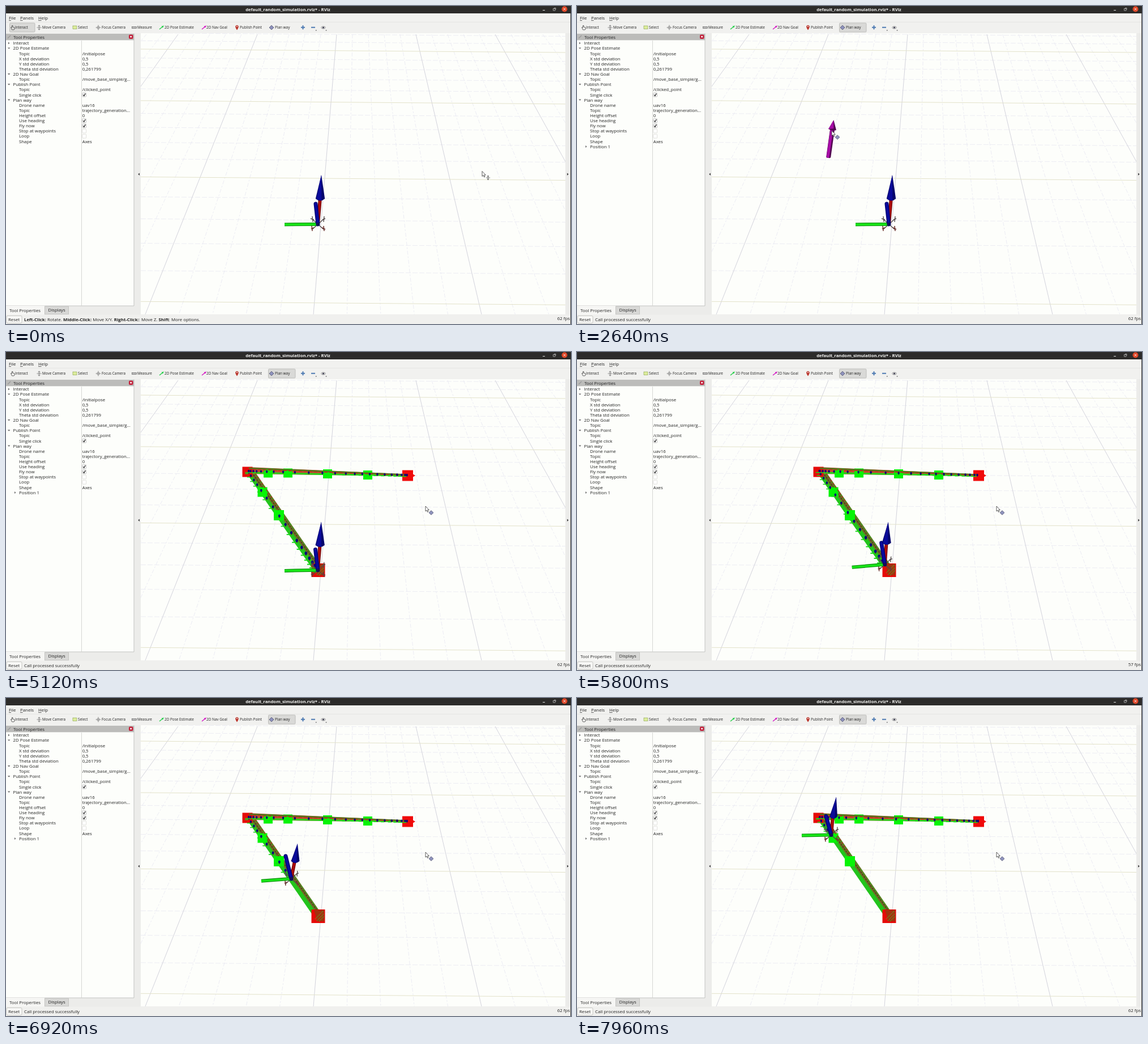
An HTML page that plays this animation: 998x561 px, repeating every 8 s.

```html
<!DOCTYPE html>
<html lang="en">
<head>
<meta charset="utf-8">
<title>Waypoint planning</title>
<style>
html, body { margin: 0; width: 100%; height: 100%; overflow: hidden; background: #efefee; }
svg { display: block; width: 100vw; height: 100vh; }
text { font-family: "Open Sans", "Noto Sans", sans-serif; font-size: 7.85px; fill: #222; white-space: pre; }
.tool { font-size: 6.4px; }
.title { font-size: 7.76px; font-weight: 700; fill: #f4f4f2; }
.b { font-weight: 700; }
</style>
</head>
<body>
<svg id="stage" viewBox="0 0 998 561"></svg>
<script>
const LOOP = 8000, STEP = 200;
const PICK = 840, DOWN1 = 2280, UP1 = 2880, DOWN2 = 3720, UP2 = 4200, SENT = 4920, START = 5000;
const stage = document.getElementById('stage');

function el(tag, attrs, parent = stage, content) {
  const node = document.createElementNS('http://www.w3.org/2000/svg', tag);
  for (const key in attrs) node.setAttribute(key, attrs[key]);
  if (content !== undefined) node.textContent = content;
  parent.appendChild(node);
  return node;
}
const group = (parent = stage) => el('g', {}, parent);
const rect = (x, y, width, height, fill, parent, more) => el('rect', { x, y, width, height, fill, ...more }, parent);
const path = (d, stroke, width = 1, parent = stage, more) =>
  el('path', { d, stroke, 'stroke-width': width, fill: 'none', ...more }, parent);
const fill = (d, color, parent) => el('path', { d, fill: color }, parent);
const text = (x, y, str, cls = '', parent = stage) => el('text', { x, y, class: cls }, parent, str);
const show = (node, on) => node.setAttribute('display', on ? 'inline' : 'none');
const move = (node, x, y) => node.setAttribute('transform', `translate(${x.toFixed(2)} ${y.toFixed(2)})`);
const mix = (a, b, u) => a + (b - a) * u;

// Value of rows [time, ...numbers] at time t
function track(rows, t, ease = u => u) {
  let i = 0;
  while (i < rows.length - 2 && t >= rows[i + 1][0]) i++;
  const a = rows[i], b = rows[i + 1];
  const u = ease(Math.min(1, Math.max(0, (t - a[0]) / (b[0] - a[0]))));
  return a.slice(1).map((v, k) => mix(v, b[k + 1], u));
}

// ---- 3D view ----
const clip = el('clipPath', { id: 'view' }, el('defs', {}));
rect(238, 48, 750, 496, '#000', clip);
const view = el('g', { 'clip-path': 'url(#view)' });
rect(238, 48, 750, 496, '#fdfefb', view);

function drawGrid() {
  for (const main of [false, true]) {
    for (let i = -20; i <= 20; i++) {
      if ((i % 5 === 0) !== main) continue;
      const top = 584 + 28 * i, bottom = 543 + 59.4 * i;
      path(`M${top} 50L${bottom} 544`, main ? '#d3d3dc' : '#e8e8f2', main ? 1 : .8, view,
        main ? {} : { 'stroke-dasharray': '7 3 3 3' });
    }
    for (let j = -1; j <= 18; j++) {
      if ((j % 5 === 0) !== main) continue;
      const y = 1000 / (1.094 + .06926 * j) - 390;
      path(`M238 ${y - 2.8}L988 ${y + 3.2}`, main ? '#e3e2ca' : '#e9e9f1', main ? 1 : .8, view,
        main ? {} : { 'stroke-dasharray': '9 3' });
    }
  }
}
drawGrid();

function bar(x1, y1, x2, y2, color, dark, w, parent) {
  const d = `M${x1} ${y1}L${x2} ${y2}`;
  path(d, dark, w, parent);
  path(d, color, w * .6, parent);
}
function axes(x, y, green, blue, red) {
  const g = group(view);
  bar(x, y, x + green[0], y + green[1], '#1cec1c', '#15a815', 5, g);
  bar(x, y, x + red[0], y + red[1], '#a01010', '#780c0c', 4.5, g);
  bar(x, y, x + blue[0], y + blue[1], '#0a0aa0', '#06066c', 4.5, g);
  return g;
}
const goal1 = axes(444, 267, [-42, 1], [-9, -31], [5, -29]);
const goal2 = axes(700, 272, [6, -29], [-5, -32], [38, -1]);

function pointer(x, y, length, head, angle, light, dark) {
  const g = el('g', { transform: `translate(${x} ${y}) rotate(${angle})` }, view);
  const neck = length - head;
  rect(0, -4, neck + 1, 8, dark, g, { rx: 2 });
  rect(0, -3.6, neck, 5, light, g, { rx: 2 });
  fill(`M${neck - 2} -7Q${neck - 5} 0 ${neck - 2} 7L${length} 0Z`, dark, g);
  fill(`M${neck - 2} -7L${neck} 2L${length} 0Z`, light, g);
  return g;
}
const arrow1 = pointer(444, 268, 67.5, 15, -82, '#a60ca6', '#520652');
const arrow2 = pointer(700, 272, 105, 20, -.5, '#dc10d8', '#780876');

// ---- Planned path ----
const from = [551, 385], corner = [428, 212];
const along = [0, .5, 2, 6, 12.5, 20, 30, 41, 55, 70.5, 88, 106, 125, 145, 163, 179, 189, 199, 208];
const across = [428, 429, 434, 439, 445, 454, 465, 478, 497, 519, 545, 568, 590, 607, 622, 634, 648, 661, 674, 686, 694, 702, 707, 709];
const flight = [
  ...along.map(s => from.map((v, k) => mix(v, corner[k], s / 212))),
  ...across.map(x => [x, 210 + (x - 428) * .025])
].map((p, i) => [START + i * STEP, ...p]);
const flightEnd = flight[flight.length - 1][0];

const plan = group(view);
function square(x, y, size, color) {
  rect(x - size / 2, y - size / 2, size, size, color, plan);
}
fill('M543 385L553 376L434 209L425 214Z', '#22c41c', plan);
fill('M547 377L554 376L436 206L430 211Z', '#6f6a24', plan);
path('M549 374L433 211', '#43431a', 1.6, plan, { 'stroke-dasharray': '3 2' });
path('M552 375L435 207', '#39a51e', 1.4, plan, { 'stroke-dasharray': '5 2' });
fill('M428 203L709 215.5V219L428 215Z', '#be4a30', plan);
path('M430 213L706 218', '#28d41c', 3, plan);
square(551.5, 385, 24, '#e60a08');
fill('M544 374H562V394H550Z', 'rgba(110,80,20,.55)', plan);
path('M549 393L561 381M553 394L562 385M546 390L560 376', '#55a023', 1.3, plan, { 'stroke-dasharray': '2 1' });
square(426.5, 211.5, 18, '#e60a08');
square(709.5, 218, 19, '#f00a0a');
fill('M718 215L723 218L718 221Z', '#f00a0a', plan);
[[463, 213.5, 16], [498, 213.5, 16], [568, 215, 16], [639, 217, 16], [453, 247, 17], [482, 288, 18]]
  .forEach(([x, y, size]) => square(x, y, size, '#06f406'));
path('M429 205L706 216.5', '#4d7a1c', 2.6, plan);
path('M436 207L706 217.5', '#c32a1c', 1.5, plan, { 'stroke-dasharray': '6 3' });
path('M436 208L482 275', '#a03a20', 1.5, plan, { 'stroke-dasharray': '4 3' });

const dots = flight.map(() => {
  const g = group(plan);
  path('M-9 3.5H-1', '#18d818', 2, g);
  path('M0 4L1 0', '#8a1414', 2, g);
  el('ellipse', { cx: 0, cy: 0, rx: 2.3, ry: 3, fill: '#06067c' }, g);
  return g;
});

// ---- Drone with its pose axes ----
const drone = group(view);
const frame = group(drone);
path('M-10 9L10 -9M-10 -9L10 9', '#504848', 1.3, frame);
path('M-10 -14L-9 -4M11 -14L10 -4M-13 -10L-7 -8M8 -8L13 -10', '#554d4d', 1.4, frame);
path('M-11 3L-10 12M10 3L11 12M-12 8L-7 6M7 6L13 9', '#713a36', 1.6, frame);
const limbs = [['#18e818', '#129c12', 6], ['#b00c0c', '#790808', 6], ['#0808a0', '#050574', 7]].map(([light, dark, w]) =>
  [path('', dark, w, drone), path('', light, w * .55, drone)]);
limbs[2].forEach(p => p.setAttribute('stroke-linecap', 'round'));
const coneDark = fill('', '#05056c', drone), coneLight = fill('', '#0a0a9a', drone);
el('circle', { cx: 0, cy: 0, r: 3, fill: '#141452' }, drone);

// time, green xy, red xy, blue xy, tip xy, cone base xy, half width
const poses = [
  [START, -59, .5, 4, -47, -4, -36, 6, -87, 4, -45, 8.2],
  [5800, -58, 5, 3, -40, -6, -38, 6, -75, 3, -38, 8],
  [6920, -53, 4, 6, -31, -10, -40, 11, -62, 7, -31, 7.5],
  [7960, -52, 1, 3, -33, -9, -33, 9, -67, 4, -32, 7]
];
function poseDrone(t) {
  const [gx, gy, rx, ry, bx, by, tx, ty, cx, cy, w] = track(poses, t);
  [[gx, gy], [rx, ry], [bx, by]].forEach(([x, y], i) =>
    limbs[i].forEach(p => p.setAttribute('d', `M0 0L${x} ${y}`)));
  coneDark.setAttribute('d', `M${tx} ${ty}L${cx + w} ${cy}Q${cx} ${cy + 7} ${cx - w} ${cy}Z`);
  coneLight.setAttribute('d', `M${tx} ${ty}L${cx + w * .3} ${cy + 3}Q${cx - w * .5} ${cy + 3} ${cx - w * .8} ${cy}Z`);
  const [x, y] = track(flight, t);
  move(drone, x, y);
}

// ---- Window frame, menu and toolbar ----
rect(0, 0, 998, 13, '#2c2b2a');
el('text', { x: 498, y: 8.5, 'text-anchor': 'middle', class: 'title' }, stage, 'default_random_simulation.rviz* - RViz');
path('M948 7.5H952', '#ddd');
path('M966.5 4.5H970V8H966.5ZM968 3.5H971V6.5', '#bbb', .8);
el('circle', { cx: 986.5, cy: 5.5, r: 5, fill: '#df4526' });
path('M984.7 3.7L988.3 7.3M988.3 3.7L984.7 7.3', '#fff', 1);
rect(0, 13, 998, 35, '#f1f1ef');
path('M0 28.5H998', '#e2e2e0', .8);
[[5, 'File', 4], [25, 'Panels', 4.6], [57, 'Help', 5.6]].forEach(([x, name, w]) => {
  text(x, 24.3, name);
  path(`M${x} 25.6h${w}`, '#222', .7);
});

function pressed(x, w) {
  return rect(x, 30, w, 16, '#d9d9d7', stage, { rx: 1.5, stroke: '#b4b4b2', 'stroke-width': .8 });
}
const interactOn = pressed(6.5, 44.5), planOn = pressed(463.5, 47.5);
[[16, 'Interact'], [64, 'Move Camera'], [127, 'Select'], [169, 'Focus Camera'], [232, 'Measure'], [280, '2D Pose Estimate'],
  [354, '2D Nav Goal'], [413, 'Publish Point'], [475, 'Plan way']].forEach(([x, name]) => text(x, 40.2, name, 'tool'));
path('M10 41L8.5 37.5L10.5 38V34.5H12V37L15 38V41L14 42H10.5Z', '#555', .9);
const cross = (r, d = r - 2) => `M${-r} 0H${r}M0 ${-r}V${r}M${-d} ${-r + 1.5}L0 ${-r}L${d} ${-r + 1.5}M${-d} ${r - 1.5}L0 ${r}L${d} ${r - 1.5}`;
path(cross(4), '#777', .9, stage, { transform: 'translate(58.5 38)' });
rect(118, 35, 7, 5.5, '#dcec9c', stage, { stroke: '#7b9a3c', 'stroke-width': .8, 'stroke-dasharray': '1.5 .7' });
path('M163 33.5V42.5M158.5 38H167.5', '#888', .9);
el('circle', { cx: 163, cy: 38, r: 2.3, fill: 'none', stroke: '#888', 'stroke-width': .8 });
rect(222.5, 36.5, 8, 3, '#bbb', stage, { stroke: '#555', 'stroke-width': .6 });
for (const [x, color] of [[271, '#24d048'], [346, '#d414c4']]) {
  path(`M${x} 41L${x + 5} 37`, color, 1.5);
  fill(`M${x + 3.5} 35.8L${x + 8} 34.5L${x + 6} 38.6Z`, color);
}
fill('M408 42.5Q404.5 37.5 405.4 35.5A2.8 2.8 0 0 1 410.6 35.5Q411.5 37.5 408 42.5Z', '#bb342b');
el('circle', { cx: 408, cy: 36, r: 1, fill: '#f1f1ef' });
const diamond = 'M0 -3.8L4 0L0 3.8L-4 0Z';
const gem = (parent, more) => el('path', { d: diamond, fill: '#8f93bd', stroke: '#4e506e', 'stroke-width': .8, ...more }, parent);
gem(stage, { transform: 'translate(469 38)' });
path('M521 37.8H528M524.5 34.3V41.3M539 37.8H546', '#4f7bb3', 2.1);
fill('M546.5 42.5h2.6l-1.3 1.4ZM564.3 42.5h2.6l-1.3 1.4Z', '#444');
el('ellipse', { cx: 560.5, cy: 38, rx: 3.8, ry: 2.2, fill: '#ddd', stroke: '#888', 'stroke-width': .7 });
el('circle', { cx: 560.5, cy: 38, r: 1.6, fill: '#445' });

// ---- Property panel ----
rect(0, 48, 238, 497, '#ececea');
rect(0, 49, 226, 11.5, '#bcbcba');
path('M3 57L8 52', '#999', 1.4);
text(13, 57.6, 'Tool Properties');
rect(217, 50.5, 7.5, 7.5, '#c3213b', stage, { rx: 2 });
el('circle', { cx: 220.7, cy: 54.2, r: 1.4, fill: '#fff' });
rect(0, 60.5, 226, 468.5, '#fdfefb');
path('M226 48.5V529H0', '#bdbdbb', .9);
path('M133.5 61V529', '#d2d2cf', .9);

const rowY = i => 65.5 + i * 9.12;
const rows = [
  [0, 'Interact'], [0, '2D Pose Estimate'], [1, 'Topic', '/initialpose'], [1, 'X std deviation', '0,5'],
  [1, 'Y std deviation', '0,5'], [1, 'Theta std deviation', '0,261799'], [0, '2D Nav Goal'],
  [1, 'Topic', '/move_base_simple/g...'], [0, 'Publish Point'], [1, 'Topic', '/clicked_point'],
  [1, 'Single click', true], [0, 'Plan way'], [1, 'Drone name', 'uav16'], [1, 'Topic', 'trajectory_generation...'],
  [1, 'Height offset', '0'], [1, 'Use heading', true], [1, 'Fly now', true], [1, 'Stop at waypoints', false],
  [1, 'Loop', false], [1, 'Shape', 'Axes']
];
const closedMark = (x, y, parent) => fill(`M${x} ${y - 2}l2.4 2l-2.4 2Z`, '#666', parent);
rows.forEach(([level, name, value], i) => {
  const y = rowY(i);
  text(level ? 23 : 12.5, y + 2.8, name);
  if (!level) {
    if (i) fill(`M3 ${y - 1.2}h4.4l-2.2 2.4Z`, '#666');
    else closedMark(4, y);
  }
  if (typeof value === 'string') text(134.7, y + 2.8, value);
  if (typeof value === 'boolean') {
    rect(134.8, y - 3.4, 6.8, 6.8, '#fff', stage, { stroke: value ? '#aaa' : '#d4d4d0', 'stroke-width': .7, rx: 1 });
    if (value) path(`M136.3 ${y}l1.5 1.9l2.5 -4.2`, '#222', 1.2);
  }
});
const positions = [1, 2, 3].map(n => {
  const g = group(), y = rowY(19 + n);
  closedMark(15, y, g);
  text(23, y + 2.8, 'Position ' + n, '', g);
  return g;
});

// ---- Tabs, status bar and edges ----
rect(0, 529, 68.5, 16, '#f6f6f4');
rect(68.5, 530, 42, 14, '#d8d8d6', stage, { stroke: '#bcbcba', 'stroke-width': .8 });
text(6, 539.7, 'Tool Properties');
text(74.5, 539.3, 'Displays');
rect(988, 48, 10, 497, '#ececea');
fill('M236 294.5v4.4l-2.8 -2.2ZM991 294.5v4.4l2.8 -2.2Z', '#444');
rect(0, 544.5, 998, 16.5, '#f0f0ee');
rect(1, 546.5, 27, 13, '#f8f8f6', stage, { rx: 2, stroke: '#bbbbb9', 'stroke-width': .8 });
text(4, 555.7, 'Reset');
const help = text(32, 555.7, '');
[['Left-Click:', ' Rotate. '], ['Middle-Click:', ' Move X/Y. '], ['Right-Click:', ': Move Z. '], ['Shift', ': More options.']]
  .forEach(([key, note]) => {
    el('tspan', { class: 'b' }, help, key);
    el('tspan', {}, help, note);
  });
const done = text(32, 555.7, 'Call processed successfully');
const fps = el('text', { x: 996, y: 554.2, 'text-anchor': 'end' }, stage, '');
path('M997.5 13V561', '#333', 1);

// ---- Cursor ----
const cursor = group();
const moveMark = path(cross(3.6, 1.4), '#777', 1.1, cursor, { transform: 'translate(10.5 11.5)' });
const gemMark = gem(cursor, { transform: 'translate(10 11.5)' });
el('path', { d: 'M0 0V9L2 7.2L3.6 10.4L5 9.7L3.6 6.6H6.3Z', fill: '#fff', stroke: '#333', 'stroke-width': .8 }, cursor);
const cursorPath = [
  [0, 841, 291.5], [120, 841, 291.5], [780, 488, 39], [920, 488, 39], [1640, 511, 285.5], [2140, 444, 267],
  [DOWN1, 444, 267], [2640, 450, 220], [UP1, 450, 218], [3560, 700, 272], [DOWN2, 700, 272], [4120, 741, 272]
];
const smooth = u => u * u * (3 - 2 * u);

function render(t) {
  const picked = t >= PICK, flying = t >= START;
  show(interactOn, !picked);
  show(planOn, picked);
  show(help, !picked);
  show(done, picked);
  show(moveMark, !picked);
  show(gemMark, picked);
  move(cursor, ...track(cursorPath, t, smooth));

  show(positions[0], picked);
  show(positions[1], t >= UP1 && t < SENT);
  show(positions[2], t >= UP2 && t < SENT);
  show(arrow1, t >= DOWN1 && t < UP1);
  show(arrow2, t >= DOWN2 && t < UP2);
  show(goal1, t >= UP1 && t < SENT);
  show(goal2, t >= UP2 && t < SENT);

  show(plan, flying);
  dots.forEach((dot, k) => {
    const at = t + (k + 1) * STEP;
    show(dot, at <= flightEnd);
    const [x, y] = track(flight, at);
    const size = mix(.72, 1.05, (y - 210) / 175);
    dot.setAttribute('transform', `translate(${x.toFixed(2)} ${y.toFixed(2)}) scale(${size.toFixed(3)})`);
  });
  poseDrone(t);
  fps.textContent = (t >= 5200 && t < 6100 ? 57 : 62) + ' fps';
}

const begin = performance.now();
function tick() {
  render((performance.now() - begin) % LOOP);
  requestAnimationFrame(tick);
}
tick();
</script>
</body>
</html>
```
